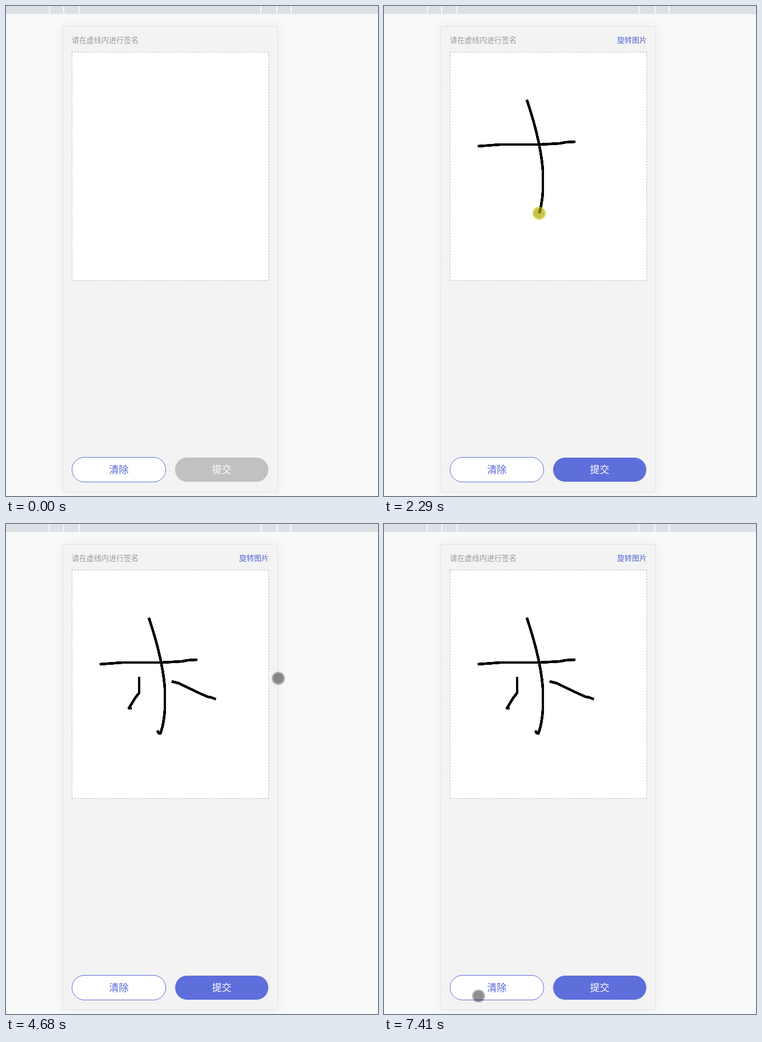
Animation, 651 px wide and 856 px high, one loop 8000 ms. Source, as an HTML page:

```html
<!DOCTYPE html>
<html lang="zh-CN">
<head>
<meta charset="utf-8">
<title>签名板</title>
<style>
  html, body { margin: 0; width: 100%; height: 100%; overflow: hidden; background: #f8faf9; }
  .stage { position: absolute; left: 0; top: 0; width: 651px; height: 856px; overflow: hidden; }
  .stage > * { position: absolute; box-sizing: border-box; }
  .ruler { left: 0; top: 0; width: 651px; height: 14px; background: #dde1e6; }
  .ruler i { position: absolute; top: 0; width: 2px; height: 13px; background: #f9fafb; }
  .panel { left: 99px; top: 35px; width: 377px; height: 814px; background: #f3f3f3;
    border: 1px solid #e3e3e3; box-shadow: 0 0 20px rgba(0, 0, 0, .06); }
  .pad { left: 115px; top: 80px; width: 345px; height: 400px; background: #fff; border: 1px dashed #bbb; }
  svg { left: 0; top: 0; }
  text { font-family: "Noto Sans CJK SC", "Noto Sans CJK", "Microsoft YaHei", sans-serif; font-size: 13px; }
  .label { font-size: 17px; text-anchor: middle; }
</style>
</head>
<body>
<div class="stage">
  <div class="ruler"></div>
  <div class="panel"></div>
  <div class="pad"></div>
  <svg width="651" height="856" viewBox="0 0 651 856">
    <clipPath id="inside"><rect x="100" y="36" width="375" height="812"/></clipPath>
    <!-- hardens the soft edges of the ink -->
    <filter id="harden" filterUnits="userSpaceOnUse" x="116" y="81" width="343" height="398">
      <feComponentTransfer><feFuncA type="linear" slope="3"/></feComponentTransfer>
    </filter>
    <text x="115" y="64" fill="#999">请在虚线内进行签名</text>
    <text id="rotate" x="408" y="64" fill="#5666d4">旋转图片</text>
    <g clip-path="url(#inside)">
      <g id="sheet">
        <rect width="343" height="398" fill="#fff"/>
        <g id="ink" transform="translate(-116 -81)" filter="url(#harden)" fill="none" stroke-width="4" stroke-linejoin="round"></g>
      </g>
    </g>
    <rect x="115.5" y="788.5" width="164" height="43" rx="21.5" fill="#fff" stroke="#5e6edb"/>
    <text class="label" x="197.5" y="816" fill="#5666d4">清除</text>
    <rect id="submit" x="295.5" y="788.5" width="164" height="43" rx="21.5" stroke="#ebedf0"/>
    <text class="label" x="377.5" y="816" fill="#fff">提交</text>
    <g id="cursor">
      <circle id="ring" r="10.6" fill="none" stroke-width="2"/>
      <circle id="dot" r="9.6"/>
    </g>
  </svg>
</div>
<script>
const LOOP = 8000, FIRST_INK = 1290, W = 343, H = 398;
const $ = id => document.getElementById(id);

// One stretch of pointer travel: it advances along its path in equal time steps.
function act(pen, from, to, steps, d, power = 1) {
  const path = document.createElementNS("http://www.w3.org/2000/svg", "path");
  path.setAttribute("d", d);
  path.setAttribute("stroke", pen ? "#000" : "none");
  $("ink").appendChild(path);
  const gap = (to - from) / (steps - 1 || 1);
  const progress = t => {
    if (t < from) return 0;
    const step = gap ? Math.floor((t - from) / gap + 1e-6) + 1 : steps;
    return Math.min(1, step / steps) ** power;
  };
  return { pen, from, path, progress, length: path.getTotalLength() };
}
const move = (...args) => act(false, ...args);
const draw = (...args) => act(true, ...args);

const acts = [
  move(70, 590, 8, "M588 764C300 260 190 72 187 245"),
  move(900, 1053, 3, "M187 245H164"),
  draw(1290, 1670, 6, "M164 245L204 242H272L308 240L318 238L335 237"),
  move(1746, 1974, 4, "M335 237L250 164"),
  draw(2050, 2284, 4, "M250 164Q274 235 278 287V325Q276 349 271.5 362", 2),
  draw(2361, 2438, 2, "M271.5 362L270 366L267 365L265 361"),
  move(2515, 2592, 2, "M265 361L233 267"),
  draw(2669, 2823, 3, "M233 267V295L226 304L215 322H220"),
  move(2900, 2900, 1, "M220 321L214 322"),
  move(3130, 3208, 2, "M214 322L291 275"),
  draw(3287, 3600, 5, "M290 275L302 278L333 293L353 302L358 302.5L367 306"),
  move(3830, 3910, 2, "M367 306L361.5 315.5"),
  move(4140, 4140, 1, "M361.5 315.5L359.5 406.5"),
  move(4217, 4830, 9, "M359.5 406.5C365 806 440 806 474 400C486 180 460 100 424.5 63.5"),
  move(6630, 7090, 7, "M424.5 63.5C400 300 295 700 351 837"),
  move(7260, 7410, 3, "M351 837L165.5 824.5")
];

// Taps on the rotate link; each release turns the sheet a quarter
const taps = [[5000, 5070], [5380, 5460], [5760, 5930], [6160, 6310]];
const presses = [[1130, FIRST_INK], ...taps];
const turns = ["", `translate(${H} 0) rotate(90)`, `translate(${W} ${H}) rotate(180)`, `translate(0 ${W}) rotate(-90)`];

const looks = {
  up: { dot: "rgba(0,0,0,.44)", ring: "rgba(0,0,0,.25)" },
  down: { dot: "rgba(169,168,0,.69)", ring: "rgba(205,204,0,.63)" }
};

for (const x of [75, 100, 127, 445, 473, 498]) {
  const mark = document.createElement("i");
  mark.style.left = x + "px";
  document.querySelector(".ruler").appendChild(mark);
}

function drawCursor(t, now) {
  $("cursor").setAttribute("visibility", now ? "visible" : "hidden");
  if (!now) return;
  const { x, y } = now.path.getPointAtLength(now.length * now.progress(t));
  const pressed = now.pen || presses.some(([a, b]) => t >= a && t < b);
  const look = pressed ? looks.down : looks.up;
  $("dot").setAttribute("fill", look.dot);
  $("ring").setAttribute("stroke", look.ring);
  $("cursor").setAttribute("transform", `translate(${x} ${y})`);
}

function render(t) {
  for (const { path, length, progress } of acts) {
    const k = progress(t);
    path.setAttribute("visibility", k ? "visible" : "hidden");
    path.setAttribute("stroke-dasharray", k < 1 ? `${k * length} ${length}` : "none");
  }

  const active = t >= FIRST_INK;
  const quarter = taps.filter(tap => t >= tap[1]).length % 4;
  $("sheet").setAttribute("transform", "translate(116 81) " + turns[quarter]);
  $("rotate").setAttribute("visibility", active ? "visible" : "hidden");
  $("submit").setAttribute("fill", active ? "#5e6edb" : "#c1c1c1");

  drawCursor(t, acts.filter(a => t >= a.from).pop());
}

const begin = performance.now();
function tick() {
  render((performance.now() - begin) % LOOP);
  requestAnimationFrame(tick);
}
tick();
</script>
</body>
</html>
```
